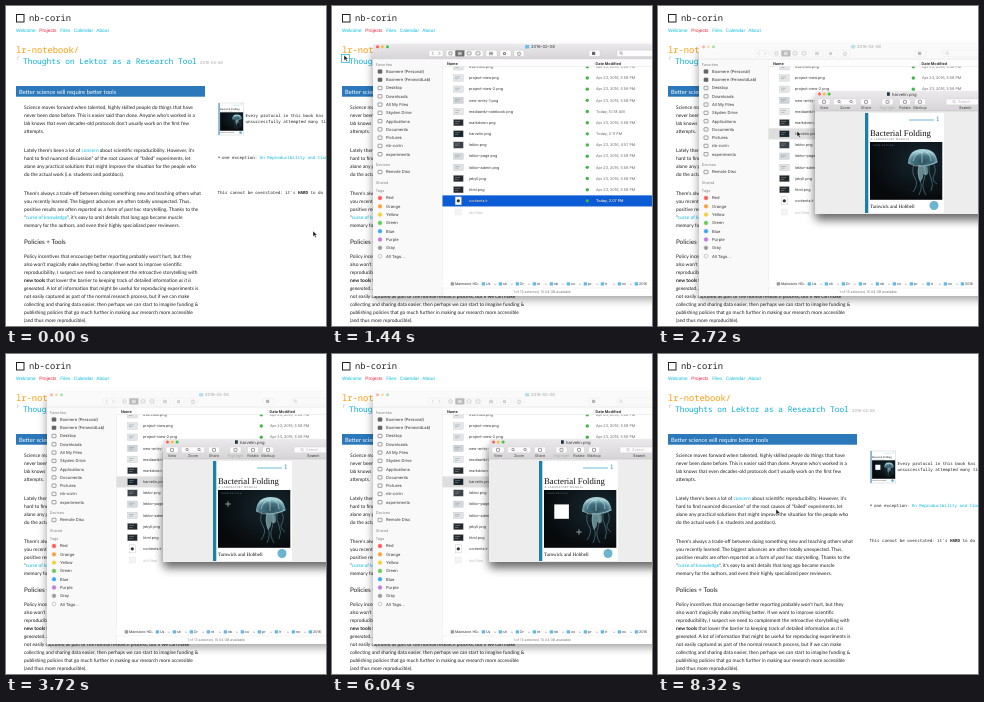
Recreate the animation shown at these times as an HTML page. Size 320 px wide and 320 px high, loop 8.48 s.

```html
<!DOCTYPE html>
<html lang="en">
<head>
<meta charset="utf-8">
<title>Notebook editing demo</title>
<style>
@property --s { syntax: "<length>"; inherits: true; initial-value: 0px; }
@property --n { syntax: "<integer>"; inherits: true; initial-value: 0; }
html, body { margin: 0; width: 100%; height: 100%; overflow: hidden; background: #fff; }
svg { display: block; width: 100vw; height: 100vh; }
text { text-rendering: geometricPrecision; white-space: pre; }
.body { font-family: Lato, sans-serif; font-size: 4.89px; fill: #1c1c1c; }
.nav { font-family: "Liberation Sans", Arial, sans-serif; font-size: 4.75px; fill: #08bce0; }
.mono { font-family: "Noto Sans Mono", monospace; font-size: 4.2px; fill: #222; }
.ui { font-family: Inter, sans-serif; font-size: 3.75px; fill: #333; }
.serif { font-family: "Liberation Serif", serif; fill: #111; }
.mid { text-anchor: middle; }
.link { fill: #08b6e0; }
.b { font-weight: bold; }
.i { font-style: italic; }

.stepped, #arrow, #cross, #cut, #finder, #preview, #sel { animation: 8480ms step-end infinite; }
#focus { animation-name: focus; }
#edited { animation-name: edited; }
#inactive { animation-name: inactive; }
#chrome { animation-name: dim; }
.pick-a { animation-name: pickA; }
.pick-b { animation-name: pickB; }
#cut { animation-name: cut; }
#arrow { animation-name: arrow; }
#cross { animation-name: cross; }
#sel { animation-name: selShow, selGrow; animation-timing-function: step-end, linear; }
#tip { animation-name: tip; }
#finder { animation-name: finder; animation-timing-function: ease-out; transform-origin: 14px 52px; }
#preview { animation-name: preview; animation-timing-function: ease-out; transform-origin: 126px 128px; }
#cursor { animation: move 8480ms ease-in-out infinite; }

@keyframes move {
  0%, 1.2% { transform: translate(307px, 225px); }
  10.4%, 18.9% { transform: translate(12px, 49px); }
  25.9%, 34% { transform: translate(139px, 125px); }
  40.6%, 43.9% { transform: translate(222px, 150px); animation-timing-function: linear; }
  51.9%, 64% { transform: translate(237px, 165px); }
  68%, 71.7% { transform: translate(247px, 178px); }
  76.4%, 94.8% { transform: translate(20px, 164px); }
  98.1%, 100% { transform: translate(118px, 155px); }
}
@keyframes arrow { 0% { opacity: 1; } 40.6% { opacity: 0; } 71.8% { opacity: 1; } }
@keyframes cross { 0% { opacity: 0; } 40.6% { opacity: 1; } 71.8% { opacity: 0; } }
@keyframes focus { 0% { opacity: 0; } 10.4% { opacity: 1; } 20% { opacity: 0; } 76.9% { opacity: 1; } 84.9% { opacity: 0; } }
@keyframes edited { 0% { opacity: 0; } 84.9% { opacity: 1; } }
@keyframes inactive { 0% { opacity: 0; } 30.2% { opacity: 1; } }
@keyframes dim { 0% { opacity: 1; } 30.2% { opacity: .45; } }
@keyframes pickA { 0% { opacity: 1; } 25.9% { opacity: 0; } }
@keyframes pickB { 0% { opacity: 0; fill: #0b5cd5; } 25.9% { opacity: 1; fill: #0b5cd5; } 30.2%, 100% { opacity: 1; fill: #dedede; } }
@keyframes finder {
  0%, 12.7% { opacity: 0; transform: scale(.6); }
  15.1%, 76.9% { opacity: 1; transform: none; }
  76.91%, 100% { opacity: 0; transform: none; }
}
@keyframes preview {
  0%, 28.3% { opacity: 0; transform: scale(.2); }
  30.2%, 76.9% { opacity: 1; transform: none; }
  76.91%, 100% { opacity: 0; transform: none; }
}
@keyframes selShow { 0% { opacity: 0; } 43.9% { opacity: 1; } 63.7% { opacity: 0; } }
@keyframes selGrow { 0%, 43.9% { --s: 0px; --n: 0; } 51.9%, 100% { --s: 15px; --n: 48; } }
@keyframes tip { 0% { opacity: 1; } 56.6% { opacity: 0; } }
@keyframes cut { 0% { opacity: 0; } 63.7% { opacity: 1; } }

#area { width: var(--s); height: var(--s); }
#tip g { transform: translate(var(--s), var(--s)); }
#size { counter-reset: n var(--n); font: 3.2px/5px Inter, sans-serif; color: #fff; text-align: center; }
#size::after { content: counter(n) " x " counter(n); }
</style>
</head>
<body>
<svg viewBox="0 0 320 320">
  <defs>
    <linearGradient id="bar" x2="0" y2="1"><stop stop-color="#ebe9eb"/><stop offset="1" stop-color="#d6d4d6"/></linearGradient>
    <radialGradient id="sea" cx=".72" cy=".3" r=".75"><stop stop-color="#16272f"/><stop offset="1" stop-color="#07090b"/></radialGradient>
    <radialGradient id="bell" cy=".75" r=".62"><stop stop-color="#2c4f5b"/><stop offset=".6" stop-color="#477483"/><stop offset="1" stop-color="#a9d3da"/></radialGradient>
    <filter id="soft" x="-20%" y="-20%" width="140%" height="140%"><feGaussianBlur stdDeviation="5"/></filter>
    <g id="art">
      <rect x="212" y="136" width="72.300" height="57.800" fill="url(#sea)"/>
      <g fill="none" stroke="#5a8c99" stroke-width=".6">
        <path d="M256 158q-3 8 1 14t-2 14M261 159q-2 9 1 15t-1 15M266 159q3 8 0 15t2 15M271 158q-1 8 2 14t0 13M275 157q4 7 1 12t3 9"/>
      </g>
      <path d="M261 158q-3 9 1 18q4-4 3-8q4 3 5-1q0-5-1-9z" fill="#9ccdd2" opacity=".6"/>
      <path d="M250 157q1-14 14.500-14t15 13q-7 5-14.500 4t-15-3z" fill="url(#bell)"/>
      <path d="M255 155q2-8 9-9M273 155q0-6-5-9M264 157v-11M250 157q7 4 15 3t14.500-4" fill="none" stroke="#c6e6ea" stroke-width=".6"/>
    </g>
    <g id="book">
      <rect x="207" y="107" width="79" height="100" fill="#fff"/>
      <rect x="207" y="107" width="3.300" height="100" fill="#1b7fa8"/>
      <path d="M251 114h25" stroke="#2c9cc0" stroke-width=".7"/>
      <text class="serif" x="278" y="114.500" font-size="7" style="fill:#1b7fa8">1</text>
      <text class="serif" x="212" y="130" font-size="8.750">Bacterial Folding</text>
      <text class="ui" x="212.500" y="134.300" style="font-size:2.600px;fill:#777;letter-spacing:.4px">A LABORATORY MANUAL</text>
      <use href="#art"/>
      <text class="ui" x="214.500" y="139.500" style="font-size:2px;fill:#6f9db0;letter-spacing:.5px">THIRD EDITION</text>
      <text class="serif" x="212" y="202" font-size="5">Tarnwick and Hobbell</text>
      <circle cx="276" cy="199.500" r="4.500" fill="#6db4d0"/>
    </g>
  </defs>

  <g id="page">
    <rect width="320" height="320" fill="#fff"/>
    <rect x="10.500" y="8.500" width="7.500" height="7.500" fill="#fff" stroke="#222"/>
    <text class="mono" x="23" y="15.300" style="font-size:8.750px">nb-corin</text>
    <g id="nav"></g>
    <text class="mono" x="10" y="47.300" style="font-size:8.750px;fill:#ff9a0a">lr-notebook/</text>
    <path d="M11.500 54v-3h2" fill="none" stroke="#c4cdd1" stroke-width=".7"/>
    <rect id="focus" class="stepped" x="9.500" y="48.500" width="8" height="8" fill="#fff" stroke="#43bfe4" stroke-width=".9"/>
    <text class="mono" x="17" y="58" style="font-size:7.840px;fill:#08b0d8">Thoughts on Lektor as a Research Tool</text>
    <text class="ui" x="194" y="57.700" style="font-size:4px;fill:#a2a2a2">2016-02-08</text>
    <rect x="10" y="80" width="189" height="10.700" fill="#2b78bb"/>
    <text class="body" x="13" y="87.700" style="font-size:5.870px;fill:#fff">Better science will require better tools</text>
    <g id="prose"></g>
    <text class="body" x="18" y="238.200" style="font-size:6.300px">Policies + Tools</text>

    <g transform="translate(212.500 97) scale(.32) translate(-207 -107)"><use href="#book"/>
      <rect id="edited" class="stepped" x="222" y="150" width="16" height="16" fill="#fff"/></g>
    <rect x="212.500" y="97" width="25.300" height="32" fill="none" stroke="#b8c6cc" stroke-width=".4"/>
    <g id="aside"></g>
  </g>

  <g id="finder">
    <rect x="41" y="44" width="300" height="249" rx="4" fill="#000" opacity=".4" filter="url(#soft)"/>
    <path d="M41 290V41q0-3 3-3h290v252z" fill="#fff"/>
    <path d="M41 53h69.500v237H41z" fill="#f9f9f9"/>
    <path d="M110.500 53v237" stroke="#e4e4e4" stroke-width=".5"/>
    <g id="files"></g>
    <path d="M110.500 53h215v7.500h-215z" fill="#fdfdfd"/>
    <path d="M110.500 60.500h215M262 54.500v5.500" stroke="#dcdcdc" stroke-width=".4"/>
    <text class="ui b" x="115" y="58.500">Name</text>
    <text class="ui b" x="263.500" y="58.500">Date Modified</text>
    <g id="side"></g>
    <path d="M110.500 273.500h215v9h-215z" fill="#fdfdfd"/>
    <path d="M110.500 282h215" stroke="#e2e2e2" stroke-width=".4"/>
    <g id="crumbs"></g>
    <text class="ui mid" x="210" y="287.300" style="font-size:3.500px;fill:#777">1 of 13 selected, 15.04 GB available</text>

    <path d="M41 53V41q0-3 3-3h290v15z" fill="url(#bar)"/>
    <path id="inactive" class="stepped" d="M41 53V41q0-3 3-3h290v15z" fill="#fafafa"/>
    <path d="M41 53h290" stroke="#cfcfcf" stroke-width=".4"/>
    <g id="chrome" class="stepped">
      <circle cx="45.500" cy="40.700" r="1.500" fill="#fc5b57"/><circle cx="50.500" cy="40.700" r="1.500" fill="#fdbc40"/><circle cx="55.500" cy="40.700" r="1.500" fill="#34c84a"/>
      <rect x="193" y="38.900" width="4.300" height="3.500" rx=".5" fill="#6cc0e8"/>
      <text class="ui" x="199" y="42.200" style="font-size:4.200px">2016-02-08</text>
      <g id="tools"></g>
    </g>
  </g>

  <g id="preview">
    <rect x="157" y="93" width="190" height="121" rx="4" fill="#000" opacity=".6" filter="url(#soft)"/>
    <path d="M157 208V88q0-3 3-3h180v123z" fill="#ededed"/>
    <path d="M157 105V88q0-3 3-3h180v20z" fill="url(#bar)"/>
    <path d="M157 105h180" stroke="#b8b8b8" stroke-width=".5"/>
    <circle cx="161.500" cy="88" r="1.500" fill="#fc5b57"/><circle cx="166.300" cy="88" r="1.500" fill="#fdbc40"/><circle cx="171.100" cy="88" r="1.500" fill="#34c84a"/>
    <rect x="229" y="86.300" width="2.800" height="3.500" fill="#1c3541"/>
    <text class="ui" x="234" y="89.500" style="font-size:4.200px">harvelin.png</text>
    <g id="ptools"></g>
    <use href="#book"/>
    <rect id="cut" x="222.300" y="150.400" width="14.600" height="14.400" fill="#fff"/>
    <g id="sel" transform="translate(222 150)">
      <rect id="area" fill="none" stroke="#d7e6f2" stroke-width=".4" stroke-dasharray="1.200 1"/>
      <g id="knobs" fill="#4d9be8" stroke="#cfe4f8" stroke-width=".4"></g>
      <g id="tip" class="stepped"><g>
        <rect x="1" y="2" width="17" height="5.500" rx="1" fill="#1d2124"/>
        <foreignObject x="1" y="2" width="17" height="6"><div id="size"></div></foreignObject>
      </g></g>
    </g>
  </g>

  <g id="cursor">
    <path id="arrow" d="M0 0v5.600l1.400-1.200 1 2.200 1-.5-1-2.100h1.800z" fill="#111" stroke="#fff" stroke-width=".5"/>
    <path id="cross" d="M-2.800 0h5.600M0-2.800v5.600" fill="none" stroke="#c3cbcf" stroke-width=".7"/>
  </g>
</svg>
<script>
const put = (id, html) => { document.getElementById(id).innerHTML = html; };
const text = (x, y, s, cls = "ui", style = "") => `<text class="${cls}" x="${x}" y="${y}" style="${style}">${s}</text>`;
const box = (x, y, w, h, fill, more = "") => `<rect x="${x}" y="${y}" width="${w}" height="${h}" fill="${fill}" ${more}/>`;
const dot = (x, y, r, fill) => `<circle cx="${x}" cy="${y}" r="${r}" fill="${fill}"/>`;
const span = (cls, s) => `<tspan class="${cls}">${s}</tspan>`;

put("nav", [["Welcome", 10], ["Projects", 33.3], ["Files", 54.3], ["Calendar", 67.8], ["About", 90.3]]
  .map(([s, x]) => text(x, 25.5, s, "nav", s === "Projects" ? "fill:#f5203e" : "")).join(""));

const paras = [
  [102.8, `Science moves forward when talented, highly skilled people do things that have
never been done before. This is easier said than done. Anyone who's worked in a
lab knows that even decades-old protocols don't usually work on the first few
attempts.`],
  [145.8, `Lately there's been a lot of ${span("link", "concern")} about scientific reproducibility. However, it's
hard to find nuanced discussion* of the root causes of "failed" experiments, let
alone any practical solutions that might improve the situation for the people who
do the actual work (i.e. students and postdocs).`],
  [189.2, `There's always a trade-off between doing something new and teaching others what
you recently learned. The biggest advances are often totally unexpected. Thus,
positive results are often reported as a form of ${span("i", "post hoc")} storytelling. Thanks to the
"${span("link", "curse of knowledge")}", it's easy to omit details that long ago became muscle
memory for the authors, and even their highly specialized peer reviewers.`],
  [251.8, `Policy incentives that encourage better reporting probably won't hurt, but they
also won't magically make anything better. If we want to improve scientific
reproducibility, I suspect we need to complement the retroactive storytelling with
${span("b", "new tools")} that lower the barrier to keeping track of detailed information ${span("i", "as it is")}
${span("i", "generated")}. A lot of information that might be useful for reproducing experiments is
not easily captured as part of the normal research process, but if we can make
collecting and sharing data easier, then perhaps we can start to imagine funding &amp;
publishing policies that go much further in making our research more accessible
(and thus more reproducible).`]
];
put("prose", paras.map(([y, s]) => s.split("\n").map((l, i) => text(18, y + i * 8, l, "body")).join("")).join(""));

put("aside",
  text(239.5, 110.8, "Every protocol in this book has been", "mono") +
  text(239.5, 116.8, "unsuccessfully attempted many times", "mono") +
  dot(213, 151.3, .7, "#222") +
  text(216, 152.6, "one exception: " + span("link", "On Reproducibility and Cloning"), "mono") +
  text(211.5, 187.8, "This cannot be overstated: it's " + span("b", "HARD") + " to do", "mono"));

// file list; the first row is half under the column header
const old = m => `Apr 23, 2016, ${m} PM`;
const files = [
  ["overview.png", old("5:58"), "#e3e6e8"],
  ["project-view.png", old("5:58"), "#e3e6e8"], ["project-view-2.png", old("5:59"), "#e3e6e8"],
  ["new-entry-1.png", old("5:58"), "#cfd4d8"], ["mediawiki-notebook.png", "Today, 10:18 AM", "#e6e8ea"],
  ["markdown.png", old("5:58"), "#2a2d30"], ["harvelin.png", "Today, 2:11 PM", "#16242c"],
  ["lektor.png", old("4:57"), "#3b4248"], ["lektor-page.png", old("5:58"), "#d5dade"],
  ["lektor-admin.png", old("5:58"), "#dfe3e6"], ["jekyll.png", old("5:58"), "#26292c"],
  ["html.png", old("5:58"), "#26292c"], ["contents.lr", "Today, 2:07 PM", ""]
];
const rowY = i => 60.83 + i * 11.17;
const pick = (cls, i, fill) => box(110.5, rowY(i) - 5.5, 215, 11.1, fill, `class="stepped ${cls}"`);
const names = (i, more, style) => text(137, rowY(i) + 1.3, files[i][0], more, style) +
  text(264, rowY(i) + 1.3, files[i][1], more, style || "fill:#666");
put("files", pick("pick-a", 12, "#0b5cd5") + pick("pick-b", 6, "#dedede") +
  files.map(([, , tone], i) => {
    const y = rowY(i);
    const icon = tone
      ? box(121.5, y - 3.2, 9.8, 6.4, tone, 'stroke="#bbb" stroke-width=".3"') + box(123, y - 1.3, 5, .5, "#8f989e") + box(123, y + .5, 3.5, .5, "#8f989e")
      : box(123.2, y - 4, 6.2, 8, "#fff", 'stroke="#aaa" stroke-width=".3"') + dot(126.3, y, 1.6, "#333");
    return icon + names(i, "ui") + dot(255.3, y, 1.7, "#43b649");
  }).join("") +
  names(12, "ui stepped pick-a", "fill:#fff") +
  box(123.2, 203, 6.2, 6, "#f4f4f4", 'stroke="#ddd" stroke-width=".3"') + text(137, 207.8, "old files", "ui", "fill:#bbb"));

// sidebar
const heads = [["Favorites", 58.7], ["Devices", 158.6], ["Shared", 176.3], ["Tags", 185]];
const places = ["Boxmere (Personal)", "Boxmere (FenwoldLab)", "Desktop", "Downloads", "All My Files", "Skyden Drive",
  "Applications", "Documents", "Pictures", "nb-corin", "experiments"];
const tags = [["Red", "#fb5c57"], ["Orange", "#f9a33a"], ["Yellow", "#f5cf3c"], ["Green", "#62cb51"], ["Blue", "#3fa4f5"],
  ["Purple", "#c57ae0"], ["Gray", "#9a9a9d"], ["All Tags...", "none"]];
const label = (y, s) => text(54, y + 1.4, s, "ui", "font-size:4.1px");
const glyph = (y, fill = "none") => box(46, y - 1.7, 4, 3.4, fill, 'rx=".5" stroke="#666" stroke-width=".6"');
put("side",
  heads.map(([s, y]) => text(43.8, y + 1.2, s, "ui", "fill:#858585")).join("") +
  places.map((s, i) => glyph(65.5 + i * 8.27, i < 2 ? "#666" : "none") + label(65.5 + i * 8.27, s)).join("") +
  glyph(166) + label(166, "Remote Disc") +
  tags.map(([s, c], i) => {
    const y = 192 + i * 8.3;
    return `<circle cx="48" cy="${y}" r="1.9" fill="${c}" stroke="${c === "none" ? "#888" : c}" stroke-width=".4"/>` + label(y, s);
  }).join(""));

// path bar
const crumbs = ["Us", "sh", "Dr", "nt", "nb", "co", "pr", "lr", "no", "2016"];
const crumb = (s, x, tone) => box(x - 4.3, 276.3, 3.4, 3.2, tone, 'rx=".4"') + text(x, 279.3, s, "ui", "font-size:3.5px");
put("crumbs", crumb("Mainstore HD", 123, "#999") + crumbs.map((s, i) => {
  const x = 154 + i * 17;
  return crumb(s, x, "#62b9e6") + text(x - 8.5, 279, "▸", "ui", "font-size:3px;fill:#999");
}).join(""));

// toolbars
const key = (x, y, w, h, fill = "#fcfcfc") => box(x, y, w, h, fill, 'rx="1" stroke="#c2c2c2" stroke-width=".3"');
const bars = (x, y, fill = "#666") => [0, 1.3, 2.6].map(d => box(x, y + d, 4, .6, fill)).join("");
const frame = (x, y, w, h) => box(x, y, w, h, "none", 'rx=".4" stroke="#666" stroke-width=".6"');
const lens = (x, y, tone) => `<circle cx="${x}" cy="${y}" r="1.200" fill="none" stroke="${tone}" stroke-width=".5"/><path d="M${x + .9} ${y + .9}l1 1" stroke="${tone}" stroke-width=".5"/>`;
put("tools",
  key(97, 44.2, 14, 6.3) + '<path d="M101.500 45.800l-1.600 1.600 1.600 1.600M106.500 45.800l1.600 1.600-1.600 1.600" fill="none" stroke="#777" stroke-width=".6"/>' +
  key(114, 44.2, 37, 6.3) + key(123.2, 44.2, 9.3, 6.3, "#6b6b6b") +
  frame(117, 45.9, 3, 3) + bars(125.8, 45.9, "#fff") + frame(135, 45.9, 4, 3) + frame(144, 45.9, 4, 3) +
  key(154, 44.2, 11, 6.3) + bars(157, 45.9) +
  key(168, 44.2, 11, 6.3) + dot(172.5, 47.4, 1.5, "#666") + dot(172.5, 47.4, .6, "#fcfcfc") +
  key(182, 44.2, 10, 6.3) + frame(185.7, 46.3, 2.6, 3) +
  key(257, 44.2, 11, 6.3) + box(260, 45.8, 3.2, 3.2, "#666") +
  key(285, 44.2, 50, 6.3) + lens(289, 47, "#777"));

const acts = [["View", 166, 12], ["Zoom", 187, 23], ["Share", 208, 11], ["Highlight", 229.5, 11], ["Rotate", 247, 11], ["Markup", 262, 11]];
put("ptools", acts.map(([s, x, w]) => {
  const tone = s === "Highlight" ? "#aaa" : "#444";
  const mark = s === "Zoom" ? lens(x - 6, 95.5, tone) + lens(x + 6, 95.5, tone) : frame(x - 1.5, 94.4, 3, 3);
  return key(x - w / 2, 93, w, 5.8) + mark + text(x, 103, s, "ui mid", `fill:${tone}`);
}).join("") +
  key(288, 93, 50, 5.8) + lens(296, 95.5, "#aaa") + text(300, 97.2, "Search", "ui", "fill:#bbb") + text(301, 103, "Search"));

// selection handles on a 3 by 3 grid without its centre
const part = k => `calc(var(--s) * ${k / 2})`;
let knobs = "";
for (let i = 0; i < 9; i++) {
  if (i === 4) continue;
  knobs += `<circle r="1.4" style="transform:translate(${part(i % 3)},${part(Math.floor(i / 3))})"/>`;
}
put("knobs", knobs);
</script>
</body>
</html>
```
